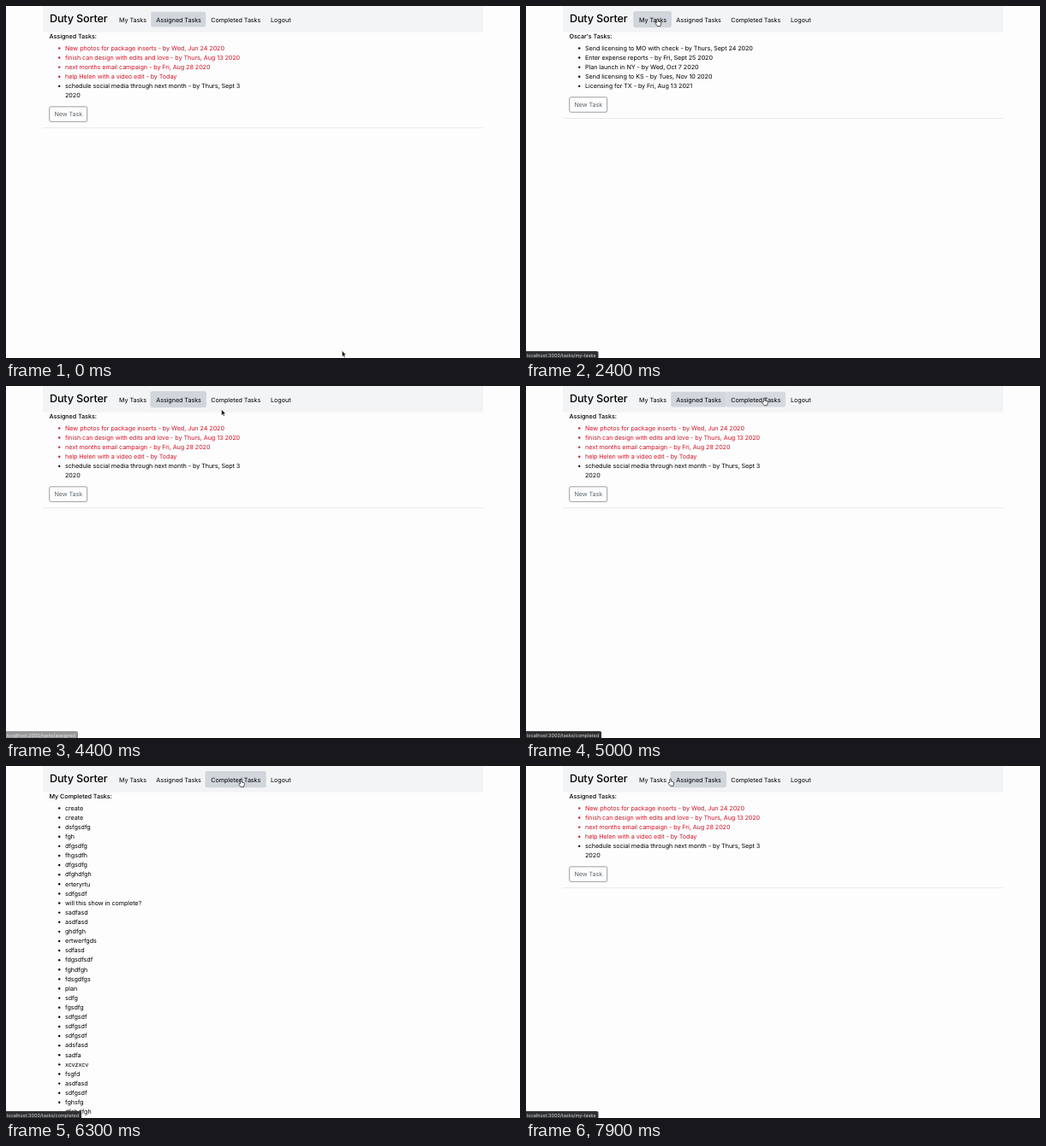
Recreate the animation shown at these times as an HTML page. Size 600x412 px, loop 8 s.

```html
<!DOCTYPE html>
<html lang="en">
<head>
<meta charset="utf-8">
<title>Task list</title>
<style>
  html, body { margin: 0; width: 100%; height: 100%; overflow: hidden; background: #fdfdfd; }
  svg { display: block; width: 100%; height: 100%; }
  text { font: 7.2px Inter, sans-serif; letter-spacing: -.055px; fill: #000; text-rendering: geometricPrecision; }
  .brand { font-size: 12.6px; font-weight: 500; letter-spacing: -.15px; }
  .head { font-weight: 500; }
  .late { fill: #cf1528; }
  .muted { fill: #5c636a; }
  .url { font-size: 5.5px; letter-spacing: 0; fill: #d4d4d4; }
</style>
</head>
<body>
<svg id="stage" viewBox="0 0 600 412"></svg>
<script>
const LOOP = 8000, STEP = 100, ROW = 11.11;

const links = [
  { label: 'My Tasks', w: 43.2, path: 'my-tasks' },
  { label: 'Assigned Tasks', w: 64, path: 'assigned' },
  { label: 'Completed Tasks', w: 69.8, path: 'completed' },
  { label: 'Logout', w: 35 }
];
links.reduce((x, link) => (link.x = x) + link.w, 126);

const pages = [
  { title: "Oscar's Tasks:", late: 0, items: [
    'Send licensing to MO with check - by Thurs, Sept 24 2020',
    'Enter expense reports - by Fri, Sept 25 2020',
    'Plan launch in NY - by Wed, Oct 7 2020',
    'Send licensing to KS - by Tues, Nov 10 2020',
    'Licensing for TX - by Fri, Aug 13 2021'] },
  { title: 'Assigned Tasks:', late: 4, wrapped: 5, items: [
    'New photos for package inserts - by Wed, Jun 24 2020',
    'finish can design with edits and love - by Thurs, Aug 13 2020',
    'next months email campaign - by Fri, Aug 28 2020',
    'help Helen with a video edit - by Today',
    'schedule social media through next month - by Thurs, Sept 3',
    '2020'] },
  { title: 'My Completed Tasks:', late: 0, items: (
    'create,create,dsfgsdfg,fgh,dfgsdfg,fhgsdfh,dfgsdfg,dfghdfgh,erteryrtu,sdfgsdf,' +
    'will this show in complete?,sadfasd,asdfasd,ghdfgh,ertwerfgds,sdfasd,fdgsdfsdf,' +
    'fghdfgh,fdsgdfgs,plan,sdfg,fgsdfg,sdfgsdf,sdfgsdf,sdfgsdf,adsfasd,sadfa,xcvzxcv,' +
    'fsgfd,asdfasd,sdfgsdf,fghsfg,dfghdfgh').split(',') }
];

// Each move eases the pointer to (x, y); sag bends its path downwards
const home = { x: 392.3, y: 403.6 };
const moves = [
  { from: 0, to: 800, x: 137, y: 1 },
  { from: 800, to: 1200, x: 151, y: 15 },
  { from: 2300, to: 3100, x: 214.3, y: 15.5 },
  { from: 3900, to: 4800, x: 278.3, y: 14.2, sag: 13 },
  { from: 6230, to: 6700, x: 213.3, y: 14.5, sag: 4 },
  { from: 7500, to: 8000, x: 163.5, y: 15 }
];
const clicks = [{ at: 0, page: 1 }, { at: 1400, page: 0 }, { at: 3000, page: 1 },
  { at: 5100, page: 2 }, { at: 7000, page: 1 }];

const clamp = v => Math.min(1, Math.max(0, v));
const ease = u => u * u * (3 - 2 * u);

function pointer(t) {
  let { x, y } = home;
  for (const m of moves) {
    const u = clamp((t - m.from) / (m.to - m.from)), e = ease(u);
    x += (m.x - x) * e;
    y += (m.y - y) * e + (m.sag || 0) * Math.sin(Math.PI * u);
  }
  return { x, y };
}

function linkAt(t) {
  const { x, y } = pointer(t);
  return y > 6 && y < 25 ? links.findIndex(l => x >= l.x && x < l.x + l.w) : -1;
}

const label = (x, y, s, cls = '') => `<text x="${x}" y="${y}" class="${cls}">${s}</text>`;
const rect = (x, y, w, h, attrs) => `<rect x="${x}" y="${y}" width="${w}" height="${h}" ${attrs}/>`;

function pageMarkup({ title, items, late, wrapped }) {
  const rows = items.map((item, i) => {
    const cls = i < late ? 'late' : '', y = 51.7 + i * ROW;
    const dot = i === wrapped ? '' : `<circle cx="62.2" cy="${y - 2.3}" r="1.2" class="${cls}"/>`;
    return dot + label(69, y, item, cls);
  });
  const top = 51.2 + items.length * ROW;
  return `<g class="page">${label(50.5, 38, title, 'head')}${rows.join('')}
    ${rect(50.7, top, 44, 17.5, 'rx="1.8" fill="none" stroke="#70777e" stroke-width=".7"')}
    ${label(56.4, top + 11.4, 'New Task', 'muted')}
    ${rect(43, top + 24.6, 514, .6, 'fill="#dedede"')}</g>`;
}

const stage = document.getElementById('stage');
stage.innerHTML = `
  ${rect(0, 0, 600, 412, 'fill="#fdfdfd"')}
  ${rect(43, 0, 514, 30.6, 'fill="#f3f4f6"')}
  ${label(51, 18.6, 'Duty Sorter', 'brand')}
  ${links.map(l => rect(l.x, 6.8, l.w, 17.6, 'rx="1.9" stroke-width="1.6" class="pill"')).join('')}
  ${links.map(l => label(l.x + 6.1, 18.6, l.label)).join('')}
  ${pages.map(pageMarkup).join('')}
  <g id="status">
    <path id="bar" fill="#303133"/>
    <text id="url" x="1" y="410.7" class="url"></text>
  </g>
  <path id="arrow" d="M0 0V6.8L1.5 5.4 2.5 7.8 3.6 7.3 2.6 5H4.7Z" fill="#111" stroke="#fff" stroke-width=".4"/>
  <path id="hand" d="M-.9 4.6V.7a.8.8 0 0 1 1.6 0V3l2.5.6q.9.3.8 1.2L3.5 7.2 3 8.6H-.2L-2.6 5.5q-.5-.9.4-1.1Z"
    fill="#fff" stroke="#222" stroke-width=".75" stroke-linejoin="round"/>`;

const [status, bar, url, arrow, hand] =
  ['status', 'bar', 'url', 'arrow', 'hand'].map(id => document.getElementById(id));
const pills = stage.querySelectorAll('.pill'), pageNodes = stage.querySelectorAll('.page');
const show = (node, visible) => node.style.display = visible ? '' : 'none';

function draw(t) {
  const { page } = clicks.filter(c => c.at <= t).pop();
  const over = linkAt(t), glow = linkAt(t - STEP);
  // Pressing the next link takes the focus ring away shortly before its page opens
  const pressed = clicks.some(c => t >= c.at - 200 && t < c.at);
  const ring = t >= clicks[1].at && !pressed;

  pageNodes.forEach((node, i) => show(node, i === page));
  pills.forEach((pill, i) => {
    pill.setAttribute('fill', i === page ? '#d1d6dd' : i === glow ? '#d6dae1' : 'none');
    pill.setAttribute('stroke', i === page && ring ? 'rgba(205,209,216,.75)' : 'none');
  });

  url.textContent = 'localhost:3000/tasks/' + (links[over] || links[page]).path;
  const width = url.getComputedTextLength() + 4;
  bar.setAttribute('d', `M0 403.9H${width - 1.8}q1.8 0 1.8 1.8V412H0Z`);
  status.style.opacity = clamp((t - 1200) / 240) * (over < 0 ? .5 : 1);

  const { x, y } = pointer(t);
  for (const node of [arrow, hand]) {
    node.setAttribute('transform', `translate(${x} ${y})`);
    show(node, (node === hand) === (over >= 0));
  }
}

const start = performance.now();
function tick() {
  const t = (performance.now() - start) % LOOP;
  draw(Math.floor(t / STEP) * STEP);
  requestAnimationFrame(tick);
}
tick();
</script>
</body>
</html>
```
